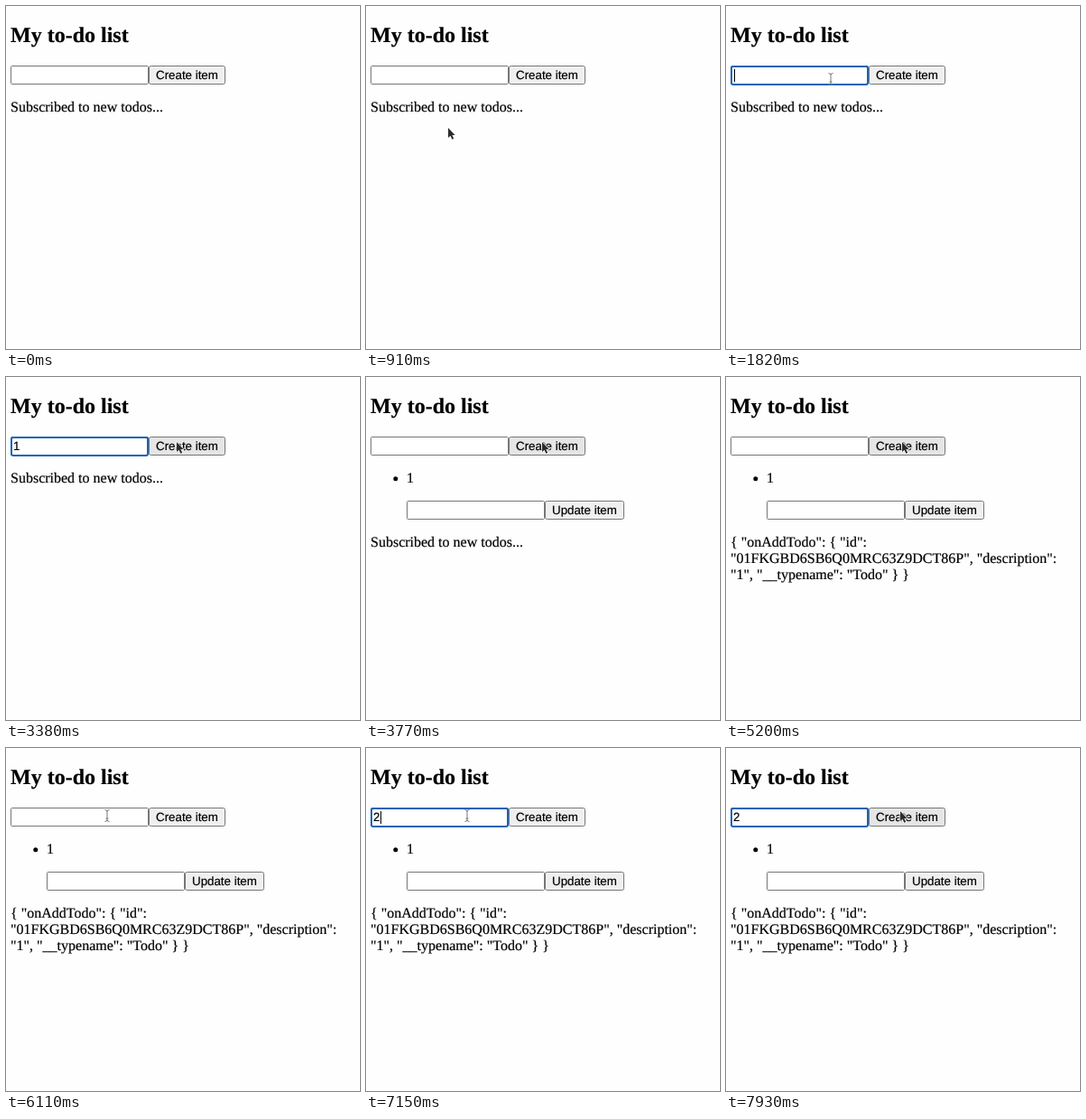
Animation of 392 by 380 pixels, one loop 8 s. Source, as an HTML page:

```html
<!DOCTYPE html>
<html lang="en">
<head>
<meta charset="utf-8">
<title>My to-do list</title>
<style>
  html, body { margin: 0; width: 100%; height: 100%; overflow: hidden; background: #fefefe; }
  svg { display: block; width: 392px; height: 380px; }
  text {
    font: 16px "Liberation Serif", Times, serif; white-space: pre;
    text-rendering: geometricPrecision; stroke: #000; stroke-width: .2;
  }
  .title { font-size: 24px; font-weight: bold; }
  .ui { font: 13.333px "Liberation Sans", Arial, sans-serif; }
  .box { fill: #fff; stroke: #767676; }
  .button { fill: #efefef; stroke: #767676; }
  .ring { fill: none; stroke: #1a62b9; stroke-width: 2; }
  .arrow { fill: #2c2c2c; stroke: #fff; stroke-width: 1.3; stroke-linejoin: round; paint-order: stroke; }
  .beam { fill: none; stroke: #777; }
</style>
</head>
<body>
<svg viewBox="0 0 392 380">
  <text class="title" x="5" y="40">My to-do list</text>

  <rect class="box" x="5.5" y="66.5" width="152" height="20" rx="1"/>
  <rect id="ring" class="ring" x="6" y="67" width="151" height="20" rx="2"/>
  <text id="value" class="ui" x="8" y="81"></text>
  <rect id="caret" y="70" width="1" height="14"/>
  <rect id="create" class="button" x="158.5" y="66.5" width="84" height="20" rx="2"/>
  <text class="ui" x="166" y="81">Create item</text>

  <g id="item">
    <circle cx="32.8" cy="112.8" r="2.5"/>
    <text x="45" y="117.4">1</text>
    <rect class="box" x="45.5" y="137.5" width="152" height="20" rx="1"/>
    <rect class="button" x="198.5" y="137.5" width="87" height="20" rx="2"/>
    <text class="ui" x="206" y="152">Update item</text>
  </g>

  <text id="waiting" x="5">Subscribed to new todos...</text>
  <g id="message">
    <text x="5" y="188.4">{ "onAddTodo": { "id":</text>
    <text x="5" y="206.4">"01FKGBD6SB6Q0MRC63Z9DCT86P", "description":</text>
    <text x="5" y="224.4">"1", "__typename": "Todo" } }</text>
  </g>

  <path id="arrow" class="arrow" d="M0 0V11L2.5 8.7 4.3 12.8 6.2 12 4.4 8H7.6Z"/>
  <path id="beam" class="beam" d="M-2.5-6.5Q0-6.5 0-4.5V4.5Q0 6.5-2.5 6.5M2.5-6.5Q0-6.5 0-4.5M0 4.5Q0 6.5 2.5 6.5M-1.5 3H1.5"/>
</svg>
<script>
const LOOP = 8000;
const REST = "#efefef", HOVER = "#e5e5e5", PRESSED = "#f5f5f5";

const start = {
  arrow: null, beam: null, focus: false, caret: false,
  value: "", button: REST, item: false, message: false
};

const pointAt = (x, y) => ({ arrow: [x, y], beam: null });
const beamAt = (x, y) => ({ arrow: null, beam: [x, y] });

// Each step changes part of the state and holds until the next.
const steps = [
  [520, pointAt(56, 275)],
  [650, pointAt(66, 215)],
  [780, pointAt(79, 165)],
  [910, pointAt(91, 135)],
  [1040, pointAt(100, 115)],
  [1170, pointAt(107, 99)],
  [1300, pointAt(112, 89)],
  [1430, beamAt(116, 81)],
  [1560, { focus: true, caret: true }],
  [2340, { caret: false }],
  [2600, { value: "1", caret: true }],
  [3120, { ...beamAt(142, 78), caret: false }],
  [3250, { ...pointAt(176, 73), button: HOVER }],
  [3380, pointAt(189, 72)],
  [3510, { ...pointAt(194, 72), button: PRESSED, focus: false }],
  [3640, { ...pointAt(195, 72), button: HOVER, value: "", item: true }],
  [4940, { message: true }],
  [5590, pointAt(185, 72)],
  [5720, pointAt(164, 72)],
  [5850, { ...beamAt(135, 74), button: REST }],
  [5980, beamAt(119, 74)],
  [6110, beamAt(112, 75)],
  [6890, { focus: true, caret: true }],
  [7150, { value: "2" }],
  [7670, { ...beamAt(136, 75), caret: false }],
  [7800, { ...pointAt(174, 71), button: HOVER }],
  [7930, pointAt(193, 70)]
];

const $ = id => document.getElementById(id);
const show = (id, on) => $(id).setAttribute("visibility", on ? "visible" : "hidden");

function place(id, spot) {
  show(id, spot);
  if (spot) $(id).setAttribute("transform", `translate(${spot})`);
}

function draw(time) {
  const past = steps.filter(([at]) => at <= time).map(([, change]) => change);
  const s = Object.assign({}, start, ...past);

  place("arrow", s.arrow);
  place("beam", s.beam);
  show("ring", s.focus);
  show("caret", s.caret);
  show("item", s.item);
  show("message", s.message);
  show("waiting", !s.message);
  $("waiting").setAttribute("y", s.item ? 188.4 : 117.4);
  $("caret").setAttribute("x", s.value ? 16 : 9);
  $("value").textContent = s.value;
  $("create").style.fill = s.button;
}

const began = performance.now();
function tick() {
  draw((performance.now() - began) % LOOP);
  requestAnimationFrame(tick);
}
tick();
</script>
</body>
</html>
```
